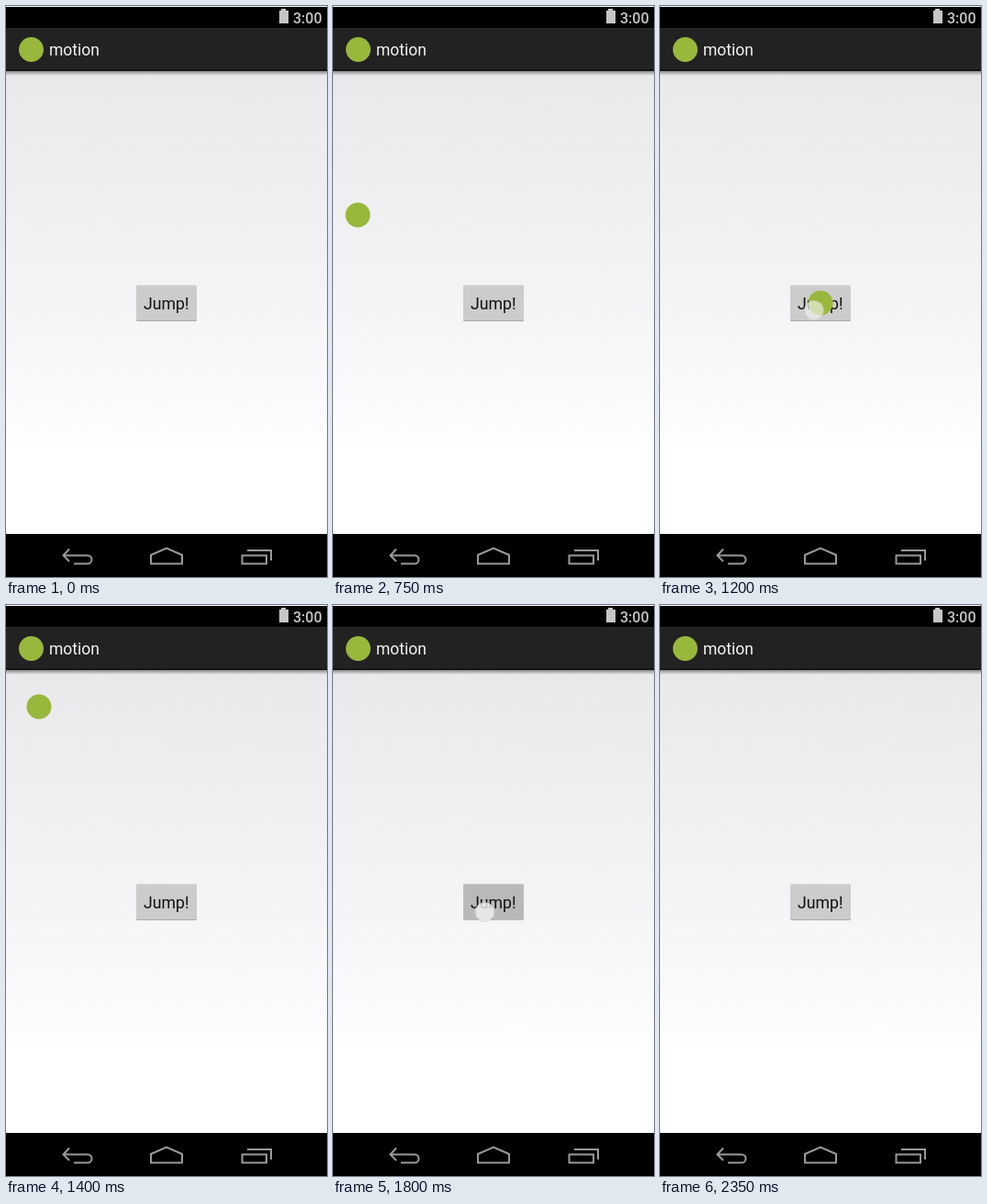
These frames come from a looping animation (350x623 px, 2.4 s). An HTML page:

```html
<!DOCTYPE html>
<html lang="en">
<head>
<meta charset="utf-8">
<title>Jump</title>
<style>
  html, body { margin: 0; width: 100%; height: 100%; overflow: hidden; background: #fff; }
  svg { display: block; width: 350px; height: 623px; font-family: Roboto, sans-serif; }
</style>
</head>
<body>
<svg viewBox="0 0 350 623">
  <defs>
    <linearGradient id="page" gradientUnits="userSpaceOnUse" x1="0" y1="70" x2="0" y2="485">
      <stop offset="0" stop-color="#e9e8eb"/>
      <stop offset=".33" stop-color="#efeef1"/>
      <stop offset=".6" stop-color="#f4f3f6"/>
      <stop offset=".9" stop-color="#fbfafc"/>
      <stop offset="1" stop-color="#fff"/>
    </linearGradient>
    <linearGradient id="shade" x1="0" y1="0" x2="0" y2="1">
      <stop offset="0" stop-color="#000" stop-opacity=".4"/>
      <stop offset="1" stop-color="#000" stop-opacity="0"/>
    </linearGradient>
  </defs>

  <rect width="350" height="623" fill="#fff"/>
  <rect y="70" width="350" height="506" fill="url(#page)"/>
  <rect y="1" width="350" height="24" fill="#000"/>
  <rect y="25" width="350" height="45" fill="#222"/>
  <rect y="24" width="350" height="1" fill="#2c2c2c"/>
  <rect y="69" width="350" height="2" fill="#151515"/>
  <rect y="71" width="350" height="5" fill="url(#shade)"/>
  <path d="M298 5h2v-2h5v2h3v14h-10z" fill="#c6c6c6"/>
  <text x="313" y="18.5" font-size="16" font-weight="500" fill="#c6c6c6">3:00</text>
  <text x="47" y="54" font-size="17.5" fill="#f3f3f3">motion</text>

  <rect y="576" width="350" height="47" fill="#000"/>
  <g fill="none" stroke="#999" stroke-width="2">
    <path d="M69 592.5L62.5 599.5L69 606M63 599.5H89A4.5 4.5 0 0 1 89 608.5H74"/>
    <path d="M158 608.5V599L175 591.5L192 599V608.5Z"/>
    <path d="M257.5 599.5H284V608.5H257.5ZM263 594H289V605"/>
  </g>

  <rect id="edge" x="142" y="306" width="66" height="38" rx="1.5" fill="#aaa"/>
  <rect id="button" x="142" y="304.5" width="66" height="38.5" rx="1.5"/>
  <text x="174.8" y="330.5" font-size="17.7" text-anchor="middle" fill="#111">Jump!</text>
  <circle id="flyer" r="13.5"/>
  <circle id="icon" cx="27.5" cy="47.5" r="13.5" fill="#98b83c"/>
  <circle id="touch" r="10.5" fill="#f2f2f2" stroke="#ccc"/>
</svg>
<script>
const LOOP = 2400, STEP = 50, PULSE = 250;
const HOME = [27.5, 47.5], BUTTON = [175, 324];

const flights = [
  { start: 600, end: 900, path: [[27, 426], [27, 300], [27, 150], HOME] },
  { start: 1200, end: 1500, path: [BUTTON, [-20, 330], [58, 26], HOME] },
  { start: 1850, end: 2100, path: [BUTTON, [220, 700], [-17, -81], HOME] }
];
const touches = [
  { start: 600, release: 600, end: 700, at: [172, 329] },
  { start: 1150, release: 1200, end: 1300, at: [168, 332] },
  { start: 1750, release: 1850, end: 1950, at: [165.5, 335] }
];

const el = id => document.getElementById(id);
const set = (id, attrs) => {
  for (const name in attrs) el(id).setAttribute(name, attrs[name]);
};
const clamp = v => Math.max(0, Math.min(1, v));
const during = (list, t) => list.find(item => t >= item.start && t < item.end);

function bezier([a, b, c, d], p) {
  const q = 1 - p;
  return [0, 1].map(i =>
    q * q * q * a[i] + 3 * q * q * p * b[i] + 3 * q * p * p * c[i] + p * p * p * d[i]);
}

function draw(t) {
  const flight = during(flights, t);
  if (flight) {
    const p = (t - flight.start) / (flight.end - flight.start);
    const [cx, cy] = bezier(flight.path, p);
    const ghost = p > 0.75;
    set("flyer", {
      cx, cy,
      fill: ghost ? "#777" : "#98b83c",
      opacity: ghost ? clamp((0.9 - p) * 4) : 1
    });
  } else {
    set("flyer", { opacity: 0 });
  }

  const landed = flights.find(f => t >= f.end && t < f.end + PULSE);
  const swell = landed ? Math.sin(Math.PI * (t - landed.end) / PULSE) : 0;
  set("icon", { r: 13.5 * (1 + 0.47 * swell) });

  const touch = during(touches, t);
  const pressed = touch && t < touch.release;
  set("button", { fill: pressed ? "#b9b9b9" : "#cdcccd" });
  set("edge", { fill: pressed ? "#b9b9b9" : "#aaa" });
  if (touch) {
    const fade = clamp((touch.end - t) / (touch.end - touch.release));
    set("touch", { cx: touch.at[0], cy: touch.at[1], opacity: (pressed ? 0.8 : 0.65) * fade });
  } else {
    set("touch", { opacity: 0 });
  }
}

const origin = performance.now();
function tick() {
  const t = (performance.now() - origin) % LOOP;
  draw(Math.floor(t / STEP) * STEP);
  requestAnimationFrame(tick);
}
tick();
</script>
</body>
</html>
```
